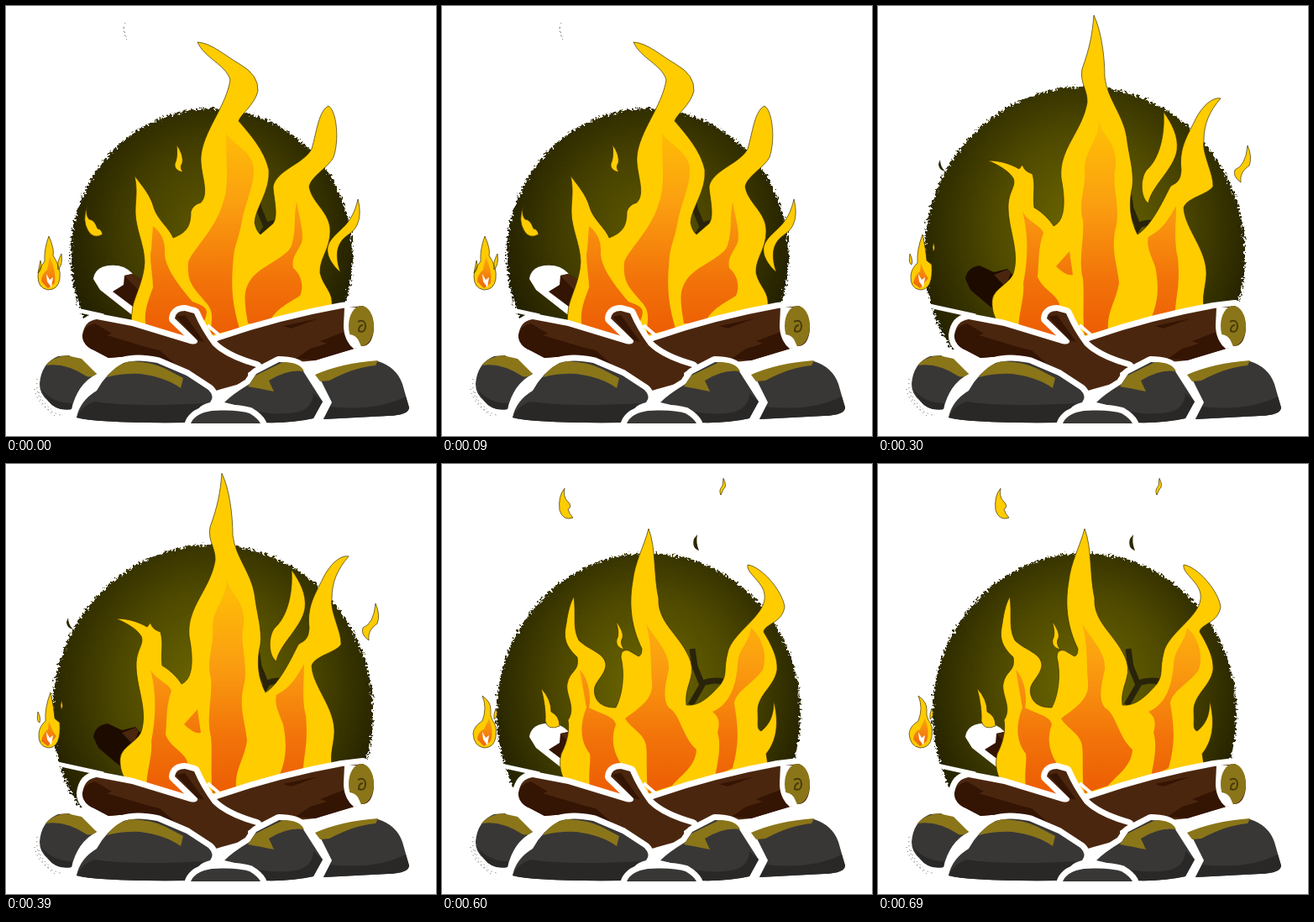
Animation, 512 px wide and 512 px high, one loop 0.75 s. Source, as an HTML page without scripts:

```html
<!DOCTYPE html>
<html lang="en">
<head>
<meta charset="utf-8">
<title>Campfire</title>
<style>
  html, body { margin: 0; width: 100%; height: 100%; overflow: hidden; background: #fff; }
  svg { display: block; width: 100%; height: 100%; }

  .pose { visibility: hidden; animation: show 750ms step-end infinite; animation-delay: calc((var(--i) - 5) * 150ms); }
  @keyframes show { 0% { visibility: visible; } 20%, 100% { visibility: hidden; } }

  .fire { fill: #fc0; stroke: #3d3200; stroke-width: .7; }
  .core { fill: url(#heat); }
  .spark { fill: url(#sparkHeat); }
  .ash { fill: #2c2800; }
  .glow { fill: url(#olive); filter: url(#rough); }
  .twig { fill: none; stroke: #29230a; stroke-width: 7; }
  .cut { stroke: #fff; stroke-width: 14; stroke-linejoin: round; paint-order: stroke; }
  .wood { fill: #4b260e; }
  .bark { fill: #341403; }
  .stone { fill: #393735; }
  .shade { fill: #2a2827; }
  .moss { fill: #8a7519; }
  .dust { fill: none; stroke: #555; stroke-dasharray: 1 4; }
</style>
</head>
<body>
<svg viewBox="0 0 512 512">
  <defs>
    <radialGradient id="olive" cy=".42" r=".58">
      <stop stop-color="#6f6900"/><stop offset=".5" stop-color="#4e4900"/><stop offset="1" stop-color="#1d1b00"/>
    </radialGradient>
    <radialGradient id="dimOlive" cy=".42" r=".58">
      <stop stop-color="#5f5900"/><stop offset=".5" stop-color="#443f00"/><stop offset="1" stop-color="#1b1900"/>
    </radialGradient>
    <linearGradient id="heat" gradientUnits="userSpaceOnUse" x1="0" y1="150" x2="0" y2="385">
      <stop stop-color="#febc06"/><stop offset=".35" stop-color="#fba010"/><stop offset=".75" stop-color="#f27309"/><stop offset="1" stop-color="#ed5f04"/>
    </linearGradient>
    <linearGradient id="sparkHeat" gradientUnits="userSpaceOnUse" x1="0" y1="295" x2="0" y2="338">
      <stop stop-color="#fdb40e"/><stop offset="1" stop-color="#ee600a"/>
    </linearGradient>
    <filter id="rough" x="-5%" y="-5%" width="110%" height="110%" color-interpolation-filters="sRGB">
      <feTurbulence type="fractalNoise" baseFrequency=".35" numOctaves="2" seed="4"/>
      <feDisplacementMap in="SourceGraphic" scale="10" xChannelSelector="R" yChannelSelector="G"/>
    </filter>
    <clipPath id="sky"><path d="M0 0H512V409H0Z"/></clipPath>

    <path id="twig" class="twig" d="M298 220L301 241L310 263L296 287M309 262Q320 256 336 259"/>
    <g id="paleLog">
      <path fill="#fff" d="M104 325Q106 311 122 309Q140 307 150 318L166 345L154 371L112 338Z"/>
      <path class="bark" d="M141 321L150 319L164 327V356L155 361L127 340L140 332Z"/>
      <path class="wood" d="M141 321L150 319L164 327V345Z"/>
    </g>
    <g id="darkLog">
      <path fill="#1d0b00" d="M104 325Q106 311 121 309L138 317L154 313L160 320L158 345L150 370L130 355L110 338Z"/>
      <path class="wood" d="M138 320L154 314L158 318L152 335Z"/>
    </g>
  </defs>

  <!-- poses -->
  <g class="pose" style="--i:0">
    <g clip-path="url(#sky)"><ellipse class="glow" style="fill:url(#dimOlive)" cx="245" cy="297" rx="168" ry="175"/></g>
    <use href="#twig"/><use href="#paleLog"/>
    <g class="fire">
      <path d="M228 43C245 44 262 60 278 69Q301 82 300 101C296 118 280 128 277 137C290 152 308 172 313 195C315 220 297 240 296 258Q298 268 303 272L318 259C325 250 318 225 318 215C322 195 355 188 364 170C370 150 372 125 384 119C394 125 397 160 390 180C384 192 363 203 361 215C364 235 386 245 386 268C386 290 373 300 374 318C378 335 390 340 388 358L240 400L160 392C150 388 148 375 150 365C150 350 164 330 165 305C165 285 154 265 154 245C154 230 157 220 153 202C162 214 172 225 176 240C180 254 195 265 199 276C215 270 220 262 220 245Q222 237 232 234C243 222 231 200 232 180C234 150 262 120 267 88C262 70 236 62 228 43Z"/>
      <path d="M203 165Q212 178 210 187Q206 192 211 198Q200 196 201 188Q205 180 203 165ZM97 238Q94 248 99 254Q105 254 109 265Q114 266 115 272Q104 278 98 268Q90 255 97 238ZM419 230C424 250 420 264 408 272C396 280 390 292 398 317C386 306 378 292 386 280C396 265 412 262 419 230Z"/>
      <path d="M51 274Q58 290 56 297Q66 312 64 325Q62 338 50 338Q38 336 38 322Q38 314 46 304Q45 290 51 274ZM66 295Q68 308 62 314Q60 306 66 295ZM41 303Q44 313 38 318Z"/>
    </g>
    <path class="core" d="M262 152C275 168 295 175 295 195C296 212 285 235 281 255C278 275 272 285 271 298C268 330 268 350 278 384L243 392C246 370 247 362 237 352C224 336 215 330 217 305C222 290 250 265 258 235C266 215 262 190 262 152ZM346 233C350 255 355 270 352 282C345 296 340 300 342 312C352 320 355 335 350 345C340 352 320 360 313 378H288C284 355 282 340 290 328C300 310 335 300 340 285C346 265 342 255 346 233ZM175 262C185 270 190 280 189 295C190 315 212 340 222 352C240 358 240 362 238 370L225 402L170 391C160 370 170 350 175 335C175 320 170 300 173 290Z"/>
    <path class="spark" d="M52 298Q60 315 58 330L50 336L42 328Q42 320 49 314Z"/>
    <path class="dust" d="M142 20Q137 30 145 42M140 26L144 40"/>
  </g>

  <g class="pose" style="--i:1">
    <g clip-path="url(#sky)"><ellipse class="glow" cx="246" cy="297" rx="181" ry="191"/></g>
    <use href="#twig"/><use href="#paleLog"/>
    <g class="fire">
      <path d="M256 36C275 40 284 85 283 105C278 130 260 135 259 160C270 185 300 195 302 208C304 225 295 240 303 260L310 275L318 270C308 262 306 245 312 232C325 215 335 190 334 165C345 180 349 195 346 206C355 195 372 185 369 160C367 145 385 125 393 101C392 125 382 160 386 180C390 200 386 225 385 240C385 260 372 275 377 298C382 318 390 325 390 345L388 358L240 400L160 392C148 388 148 372 150 368C155 350 163 335 162 325C166 318 152 310 152 296Q160 294 166 299C168 280 146 260 145 235C145 222 149 215 148 203C156 225 172 250 181 273C200 255 222 240 218 220C210 205 203 195 204 175C206 150 240 130 245 100C248 80 245 38 256 36Z"/>
      <path d="M430 203C438 215 437 235 430 243C420 252 405 258 404 270Q402 280 407 296C395 290 390 275 393 265C400 252 420 250 426 235Q430 225 430 203ZM77 188Q78 198 83 200Q88 206 88 211Q78 212 75 203ZM193 150Q197 157 195 162Q191 157 193 150Z"/>
      <path d="M52 270Q59 290 57 299Q66 310 64 325Q62 338 50 338Q36 336 36 321Q39 310 46 306Q45 290 52 270ZM66 291Q70 300 62 307Q62 298 66 291ZM38 300Q42 308 40 314Q36 308 38 300Z"/>
    </g>
    <path class="core" d="M246 192C262 210 272 225 270 245C266 270 270 285 274 297C290 305 288 325 284 340C276 352 272 365 274 383L246 392C242 375 246 350 243 335C236 320 230 325 226 332C215 330 205 318 215 308C230 296 250 290 252 270C258 245 254 220 246 192ZM167 277C178 285 190 298 192 310C193 325 210 340 228 350C232 356 228 365 226 402L172 391C160 370 165 345 175 335C182 320 180 295 167 277ZM363 192C375 205 378 225 372 245C365 260 350 275 352 295C356 320 350 345 325 370C335 340 332 310 332 290C328 265 335 245 340 230C350 215 362 215 363 192Z"/>
    <path class="spark" d="M52 294Q58 315 57 330L50 336L41 328Q43 318 50 314Z"/>
  </g>

  <g class="pose" style="--i:2">
    <g clip-path="url(#sky)"><ellipse class="glow" cx="246" cy="297" rx="191" ry="201"/></g>
    <use href="#twig"/><use href="#darkLog"/>
    <g class="fire">
      <path d="M257 11C266 30 270 60 270 85C273 110 292 130 296 155C299 180 305 195 303 215C298 235 300 255 309 272C325 262 338 235 348 215C355 210 360 210 361 195C358 170 368 155 377 137C385 120 398 108 408 110C395 125 388 140 388 160C385 175 400 200 399 215C392 225 368 228 364 240C365 265 392 290 391 320C390 335 386 345 388 358L240 400L160 392C140 380 135 365 136 350C138 335 160 330 162 315C168 290 155 265 155 240C155 220 165 215 161 205C155 195 140 188 131 184C145 184 158 188 168 194L172 189Q174 197 184 200C188 215 184 225 186 240C195 245 205 255 209 262C225 255 222 225 218 205C215 170 243 150 249 115C250 100 240 92 243 75C252 50 255 35 257 11Z"/>
      <path d="M340 126C350 140 358 155 356 172C352 195 325 215 322 235C312 228 312 205 320 195C332 185 342 160 340 126ZM440 166Q446 180 442 190Q430 198 432 210Q422 203 425 195Q438 190 440 166Z"/>
      <path d="M53 272Q57 290 58 303L64 308Q66 338 50 338Q38 336 39 321Q40 312 47 306Q46 290 53 272ZM66 282Q69 289 66 292Q64 288 66 282ZM38 295Q42 303 40 308Q36 307 38 295Z"/>
    </g>
    <path class="core" d="M263 135C265 155 285 160 283 190C278 215 288 235 284 260C276 290 285 305 287 330C284 350 272 365 274 385L246 392C243 370 246 345 244 325C238 300 246 280 244 255C238 235 248 215 246 195C246 170 262 165 263 135ZM172 245C180 258 195 262 197 270C190 290 192 305 190 322C196 340 220 345 216 362L222 402L168 391C165 370 175 350 173 330C178 305 180 275 172 245ZM355 238C355 260 352 280 357 300C360 330 355 345 354 362L325 372C335 350 334 330 330 310C322 290 320 285 322 275C340 265 345 255 355 238ZM212 310L228 292L232 320Q224 322 212 310Z"/>
    <path class="spark" d="M51 306Q56 320 60 324L50 336L42 330Q44 320 50 316Z"/>
    <path class="ash" d="M74 183Q74 191 80 197Q72 195 72 188Z"/>
  </g>

  <g class="pose" style="--i:3">
    <g clip-path="url(#sky)"><ellipse class="glow" cx="246" cy="297" rx="191" ry="201"/></g>
    <use href="#twig"/><use href="#darkLog"/>
    <g class="fire">
      <path d="M254 78C258 100 262 120 262 140C272 160 292 175 294 195C296 215 280 225 286 245C292 265 302 275 300 295C312 290 316 285 316 275C312 260 318 252 320 249C328 250 330 258 333 268C340 250 332 235 334 215C340 185 362 175 371 149C374 180 362 215 363 235C365 255 374 265 373 290C368 305 360 320 366 330C375 325 385 325 387 335Q388 345 385 358L240 400L160 392C140 380 128 365 130 352C138 330 132 305 119 286C132 295 137 310 142 325C150 330 158 330 160 315C164 300 148 285 149 265C153 245 162 220 152 208C146 200 145 195 145 160C155 180 163 210 178 225C192 240 208 255 205 275Q205 288 210 290C220 275 220 245 214 217L222 224C230 212 245 212 247 200C247 180 238 170 240 145C248 120 252 100 254 78Z"/>
      <path d="M155 112C160 125 152 140 158 145Q164 148 160 155Q170 158 168 168Q155 175 145 155Q142 135 155 112ZM342 42C350 55 351 68 347 76Q335 84 343 98Q330 94 331 86Q345 75 342 42ZM305 93Q303 108 307 119Q296 122 297 108Q300 96 305 93ZM449 121Q451 129 444 135Q443 130 449 121ZM33 273L35 277L32 278Z"/>
      <path d="M49 281Q54 300 54 310Q58 320 64 318Q66 322 60 330Q58 338 50 338Q40 336 39 325Q40 315 46 310Q45 295 49 281Z"/>
    </g>
    <path class="core" d="M260 165C262 185 273 200 274 215C270 235 280 250 288 280C300 300 305 320 313 350C308 365 290 372 274 383L246 392C242 375 245 350 243 335C240 320 220 310 214 305C225 290 245 285 246 265C252 245 256 200 260 165ZM171 228C185 245 192 265 196 280C203 300 210 310 212 325C214 345 218 355 222 402L175 393C160 375 165 355 172 342C182 320 178 310 175 295C164 285 162 265 171 228ZM348 240C355 260 355 280 350 300C352 320 345 335 345 345Q360 338 366 345L360 362L325 372C330 350 320 335 305 325C315 310 338 300 344 280Z"/>
    <path class="spark" d="M50 308Q52 320 58 324L50 336L42 328Q43 318 49 316Z"/>
  </g>

  <g class="pose" style="--i:4">
    <g clip-path="url(#sky)"><ellipse class="glow" cx="246" cy="297" rx="181" ry="191"/></g>
    <use href="#twig"/><use href="#paleLog"/>
    <g class="fire">
      <path d="M246 77C255 100 252 135 258 160C256 190 286 205 296 235C302 255 288 265 291 287C302 288 313 284 332 262C340 250 335 245 340 225C345 200 388 180 384 155C382 140 362 130 364 120C380 122 405 150 408 170C405 190 384 190 383 200C392 215 400 230 399 245C396 265 375 275 376 295C377 310 374 315 380 318C390 310 395 300 395 282C402 310 398 330 386 345L388 358L240 400L160 392C142 380 138 360 142 345C150 330 152 315 150 305C160 290 147 275 149 262C152 245 164 248 161 230C145 215 145 205 148 190C150 175 153 165 157 158C160 180 155 195 163 210C175 222 195 225 195 240C193 255 178 260 182 275C186 290 202 290 207 290C215 275 218 250 213 230Q213 220 222 222L234 229Q238 228 238 220C226 195 222 170 227 140C230 115 240 100 246 77Z"/>
      <path d="M118 267Q130 280 130 295Q140 300 140 312Q126 318 123 306Q124 290 118 267ZM207 187Q217 200 215 207Q211 213 217 221Q206 218 208 209Q212 202 207 187ZM146 29Q144 38 149 44Q156 50 150 54Q152 60 156 64Q144 68 140 55Q138 38 146 29ZM335 17Q340 27 335 30L332 37Q329 31 334 26Z"/>
      <path d="M48 276Q58 283 58 292Q57 300 60 305Q66 312 64 325Q62 338 50 338Q38 336 37 321Q38 312 48 306Q54 290 48 276ZM64 291Q68 300 62 304Q61 298 64 291Z"/>
    </g>
    <path class="core" d="M243 190C255 210 272 225 270 245C266 262 262 280 270 290C284 298 286 325 303 340C302 360 285 370 274 383L246 392C242 375 245 350 243 335C240 320 225 315 218 303C235 290 252 280 250 260C248 235 250 215 243 190ZM164 245C175 255 178 280 175 290C190 298 205 300 207 310C200 330 205 345 215 360L220 402L178 393C172 375 178 355 176 345C160 325 168 300 172 290ZM368 195C380 205 388 225 382 245C370 262 350 270 348 285C352 310 355 330 346 362L325 372C330 350 332 330 328 320C332 305 328 300 322 295C345 285 350 260 352 240C352 220 365 215 368 195Z"/>
    <path class="spark" d="M56 303Q62 318 58 330L50 336L42 328Q43 318 50 316Z"/>
    <path class="ash" d="M304 84Q302 94 306 103Q297 100 300 89Z"/>
  </g>

  <!-- logs -->
  <g>
    <path fill="none" stroke="#fff" stroke-width="5" d="M52 355L116 369"/>
    <path fill="#fff" d="M48 319L52 326L56 323L54 335L49 328Z"/>
    <path class="wood cut" d="M248 400Q322 374 400 360L425 357Q438 364 438 385Q436 405 424 405L368 422L297 429L262 413Z"/>
    <path class="bark" d="M362 408L382 402L374 399L403 388L418 407L368 422L345 420ZM330 381L372 372L340 384Z"/>
    <path fill="#fff" d="M403 359H420L414 380L424 407L414 408Q402 398 402 380Z"/>
    <ellipse class="moss" cx="423" cy="381" rx="15" ry="24"/>
    <path fill="#fff" d="M402 382Q408 384 409 391Q418 392 421 401L424 408L410 404Z"/>
    <path fill="none" stroke="#4b3d08" stroke-width="2" d="M419 376Q428 372 428 382Q427 390 420 387Q420 380 425 380"/>
    <path class="wood cut" d="M91 392Q93 375 108 373L150 381L219 402Q229 404 228 398L201 372Q202 363 213 363L224 366Q232 385 246 404Q262 420 298 430L288 437L289 447L250 458L215 438L160 416L122 419L105 410Q91 404 91 392Z"/>
    <path class="bark" d="M91 392Q94 380 106 378L126 390L120 392L170 407L183 410L215 438L160 416L122 419L105 410Q91 404 91 392ZM203 370L213 368L236 400L228 398Z"/>
    <path fill="none" stroke="#fff" stroke-width="4" d="M240 380L254 392"/>
  </g>

  <!-- stones -->
  <g>
    <g class="stone cut">
      <path d="M40 450Q42 425 62 417L75 416L108 438Q85 450 78 480Q60 483 50 470Q40 462 40 450Z"/>
      <path d="M371 438L443 423Q465 430 472 450L480 478Q480 487 455 488L378 492L388 472Z"/>
      <path d="M84 490Q88 470 108 458Q120 436 140 425Q155 420 180 425L215 440L241 457Q249 465 243 472Q226 476 214 496Q110 497 84 490Z"/>
      <path d="M260 472Q270 462 290 450L298 438L325 424Q345 424 352 432L377 471L366 491Q340 497 307 496Q298 480 260 472Z"/>
    </g>
    <path class="shade" d="M84 490Q90 476 105 471Q150 478 235 473L214 496Q110 497 84 490ZM272 476Q310 489 345 484Q365 480 366 461L377 471L366 491Q340 497 307 496Q298 480 272 476ZM378 492L386 477Q440 483 476 465L480 478Q480 487 455 488ZM41 455Q55 473 79 473L78 480Q60 483 50 470Z"/>
    <path class="stone cut" d="M220 497Q225 485 245 482Q275 480 290 485Q300 491 303 497Z"/>
    <path fill="#fff" d="M205 498H320V512H205Z"/>
    <path class="moss" d="M47 428Q55 418 72 416L90 420L108 438Q102 443 96 441Q70 424 47 428ZM120 442Q132 425 150 423Q175 424 190 432L211 443L208 455Q190 442 160 438Q140 437 120 442ZM297 440L330 424Q350 424 355 435Q335 432 313 446L319 459Q300 455 288 453ZM368 439Q400 425 443 422L440 428Q415 430 385 446L374 447Z"/>
    <path class="dust" d="M37 444Q34 470 58 488M34 456Q38 480 68 488M39 460Q44 474 54 480"/>
  </g>
</svg>
</body>
</html>
```
